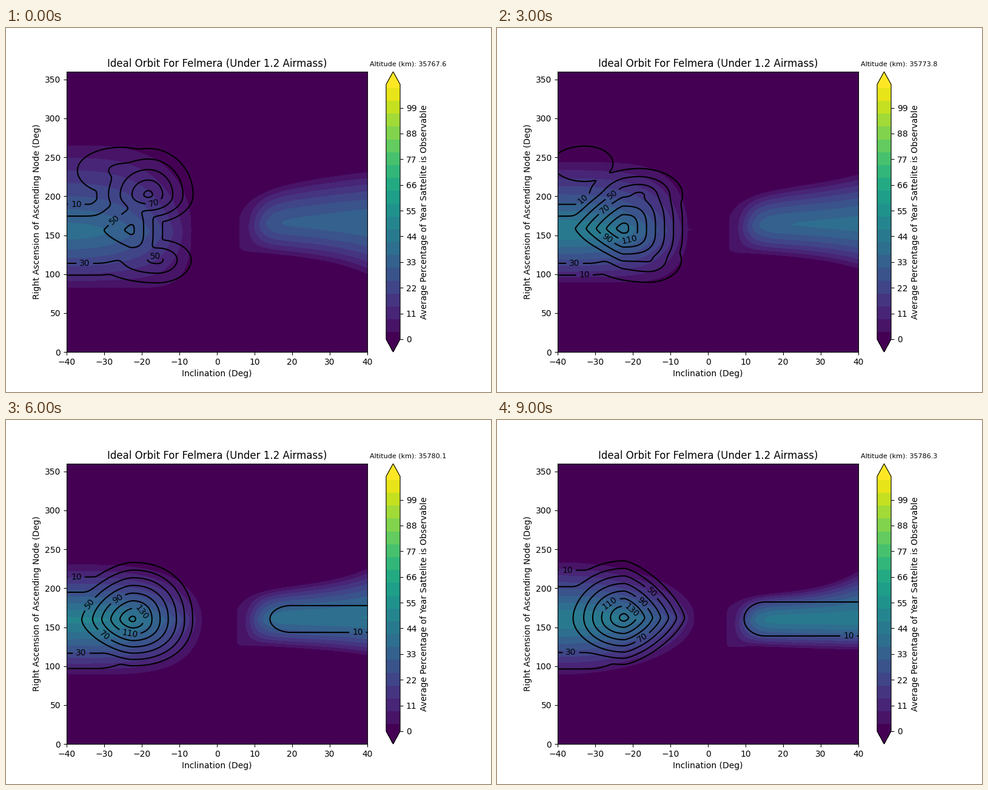
Animation, 800 px wide and 600 px high, one loop 10000 ms. Source, as a matplotlib script:

```python
import numpy as np
import matplotlib.pyplot as plt
from matplotlib.animation import ArtistAnimation
from matplotlib.cm import ScalarMappable
from matplotlib.colors import ListedColormap, Normalize

FRAMES = 10
TOP = 109
STEPS = 3 + 5.5 * np.arange(20)
LINES = range(10, 151, 20)

# The fields are shaped in stage pixels, then plotted in degrees.
gx, gy = np.meshgrid(np.linspace(100, 596, 249), np.linspace(72, 534, 232))
incl = (gx - 100) / 6.2 - 40
node = (534 - gy) / 462 * 360


def track(t, times, values):
    return np.interp(t, times, values)


def ease(t, start, end):
    s = np.clip((t - start) / (end - start), 0, 1)
    return s * s * (3 - 2 * s)


def band_colour(v):
    k = np.searchsorted(STEPS, v, side="right")
    mid = np.where(k == 0, 0, np.where(k == 20, TOP, 0.25 + 5.5 * k))
    return plt.cm.viridis(mid / TOP)


def ridge(crest, up, down, peak, up_power, down_power):
    """Falls from the crest value to 3 at the upper and lower edges."""
    above = gy < crest
    u = np.abs(gy - crest) / np.maximum(np.where(above, up, down), 0.5)
    fall = u ** np.where(above, up_power, down_power)
    return np.maximum(3 + np.maximum(peak - 3, 0.1) * (1 - fall), 0)


def shading(t):
    w = t / 9
    # Left ridge, closing at its right tip.
    tip = track(t, [0, 7], [306, 325])
    s = np.clip((gx - 100) / (tip - 100), 0, 1)
    crest = 335 - 9 * w
    up = crest - track(t, [0, 5, 9], [194, 240, 235])
    down = track(t, [0, 3], [428, 419]) - crest
    up = up * np.sqrt(1 - s ** track(t, [0, 3, 5, 7], [3.5, 5, 5, 2]))
    down = down * np.sqrt(1 - s ** track(t, [0, 5, 8], [10, 6, 2]))
    height = track(t, [0, 1, 5, 9], [36, 42, 46, 44])
    peak = 3 + height * (1 - s ** track(t, [0, 5], [2.3, 3]))
    left = ridge(crest, up, down, peak, 1.05, 1.25)

    # Right ridge, opening from its left tip.
    tip = 384 - 5 * w
    s = np.clip((gx - tip) / (596 - tip), 0, 1)
    crest = 321 + 7 * w + 13 * (1 - s) ** 8
    up = (83 - 36 * w) * s ** (0.3 - 0.18 * w) + 31 * w * s ** 4
    down = (62 - 12 * w) * s ** (0.17 - 0.07 * w) + 22 * (1 - w) * s ** 4
    rise = 1 - np.exp(-(s / 0.17) ** 2)
    peak = 3 + (26 + 14.5 * w) * rise + (6 - 4.5 * w) * s
    right = ridge(crest, up, down, peak, 1.5, 1.5)
    return np.where(gx < 345, left * (gx < 100 + (318 + 7 * w - 100)), right * (gx > tip))


def lobe(height, x, y, radii, left_power=2, right_power=2):
    """Cone with its own radius to the left, right, top and bottom."""
    left, right, up, down = radii
    dx = np.abs(gx - x) / np.where(gx < x, left, right)
    dy = np.abs(gy - y) / np.where(gy < y, up, down)
    n = np.where(gx < x, left_power, right_power)
    return height * np.clip(1 - (dx ** n + dy ** n) ** (1 / n), 0, 1)


def score(t):
    late = ease(t, 4, 8)
    reach = track(t, [0, 2, 3], [60, 70, 106])
    main = lobe(162 - 85 * np.exp(-t / 2), 206 + 4 * t / 9, 333 - 7 * t / 9,
                (118, reach, 100, 82), 1.2 + 0.8 * late, 3 - 1.6 * late)
    upper = lobe(track(t, [0, 3, 6], [98, 75, 0]), 235, 275,
                 (95, 82, track(t, [0, 3], [85, 50]), 52))
    lower = lobe(track(t, [0, 3, 5], [58, 52, 0]), 250, 382, (120, 67, 40, 46))
    cap = lobe(track(t, [0, 3, 4.5], [38, 22, 0]), 190 - 15 * min(t, 3), 235 - 4 * min(t, 3),
               (98, 85, 52, 55))

    widen = ease(t, 4, 7)
    dx = np.maximum(gx - 150, 0) / 100
    dy = (gy - 349 + 20 * widen) / (66 + 26 * widen)
    tail = 46 * np.clip(1 - dx ** 2 - dy ** 2, 0, 1)

    # The far tongue grows leftwards from the right border.
    start = 405 + 70 * np.exp((5 - t) / 1.2)
    dx = np.maximum(start + 35 - gx, 0) / 35
    dy = (gy - 328) / (21 + 7 * ease(t, 5, 9))
    tongue = 10 * np.clip(2 - dx ** 2 - dy ** 2, 0, 2)

    parts = (main, upper, lower, cap, tail, tongue)
    return sum(p ** 8 for p in parts) ** (1 / 8)


fig, ax = plt.subplots(figsize=(8, 6), dpi=100)
ax.set(xlim=(-40, 40), ylim=(0, 360), xlabel="Inclination (Deg)",
       ylabel="Right Ascension of Ascending Node (Deg)",
       title="Ideal Orbit For Felmera (Under 1.2 Airmass)")
cmap = ListedColormap(band_colour((np.arange(2 * TOP) + 0.5) / 2))
bar = fig.colorbar(ScalarMappable(Normalize(0, TOP), cmap), ax=ax, extend="both", ticks=range(0, 100, 11))
bar.set_label("Average Percentage of Year Sattelite is Observable")
levels = np.r_[-1, STEPS, 120]
fills = band_colour((levels[:-1] + levels[1:]) / 2)


def scene(t):
    fill = ax.contourf(incl, node, shading(t), levels=levels, colors=fills)
    lines = ax.contour(incl, node, score(t), levels=LINES, colors="black")
    labels = ax.clabel(lines, fmt="%d")
    note = fig.text(0.75, 537 / 600, f"Altitude (km): {35767.58 + 2.08 * t:.1f}", fontsize=8)
    return [fill, lines, *labels, note]


scenes = [scene(t) for t in range(FRAMES)]
anim = ArtistAnimation(fig, scenes, interval=1000, repeat=True, repeat_delay=0, blit=False)
plt.show()
```
